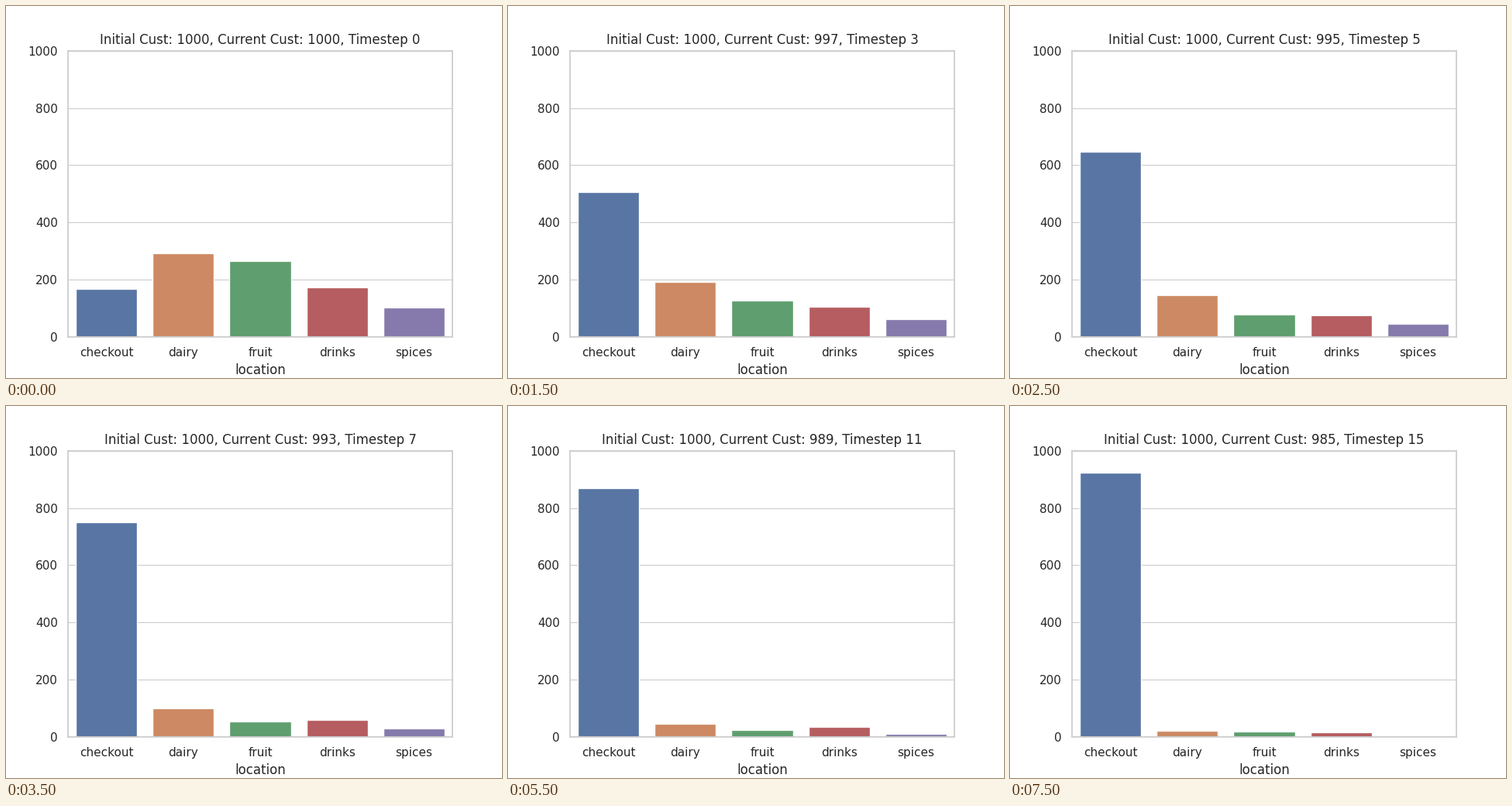
These frames come from a looping animation (640 px wide and 480 px high, 8000 ms). A matplotlib script:

```python
import matplotlib.pyplot as plt
import numpy as np
from matplotlib.animation import FuncAnimation

INK, LINE = "#262626", "#cccccc"
STEPS = 16
START = 1000

plt.rcParams.update({
    "font.family": "DejaVu Sans",
    "text.color": INK,
    "axes.labelcolor": INK,
    "axes.edgecolor": LINE,
    "axes.linewidth": 1.25,
    "axes.axisbelow": True,
    "axes.titlesize": 12,
    "axes.labelsize": 12,
    "grid.color": LINE,
    "grid.linewidth": 0.8,
    "xtick.labelsize": 11,
    "ytick.labelsize": 11,
})

COLORS = {
    "checkout": "#5875a4",
    "dairy": "#cc8963",
    "fruit": "#5f9e6e",
    "drinks": "#b55d60",
    "spices": "#857aab",
}

# Each aisle empties exponentially between a few key steps.
KEY_STEPS = (0, 5, 11, 15)
AISLES = {
    "dairy": (292, 147, 47, 22),
    "fruit": (265, 79, 26, 20),
    "drinks": (173, 76, 36, 16),
    "spices": (103, 46, 11, 4),
}


def shoppers(aisle, step):
    return round(np.exp(np.interp(step, KEY_STEPS, np.log(AISLES[aisle]))))


fig, ax = plt.subplots(figsize=(6.4, 4.8), dpi=100, facecolor="white")
bars = ax.bar(range(len(COLORS)), [0] * len(COLORS), width=0.8,
              color=list(COLORS.values()), edgecolor="white", linewidth=1)
ax.set_xlim(-0.5, 4.5)
ax.set_ylim(0, 1000)
ax.set_xticks(range(len(COLORS)), list(COLORS))
ax.set_yticks(range(0, 1001, 200))
ax.tick_params(length=6, pad=3.5, labelcolor=INK, left=False, bottom=False)
ax.grid(axis="y")
ax.set_xlabel("location")
title = ax.set_title("")


def update(step):
    current = START - step
    counts = [shoppers(aisle, step) for aisle in AISLES]
    # Everyone who has left the aisles is at the checkout.
    for bar, count in zip(bars, [current - sum(counts), *counts]):
        bar.set_height(count)
    title.set_text(f"Initial Cust: {START}, Current Cust: {current}, "
                   f"Timestep {step}")
    return [*bars, title]


anim = FuncAnimation(fig, update, frames=STEPS, interval=500,
                     repeat=True, repeat_delay=0, blit=False)
plt.show()
```
